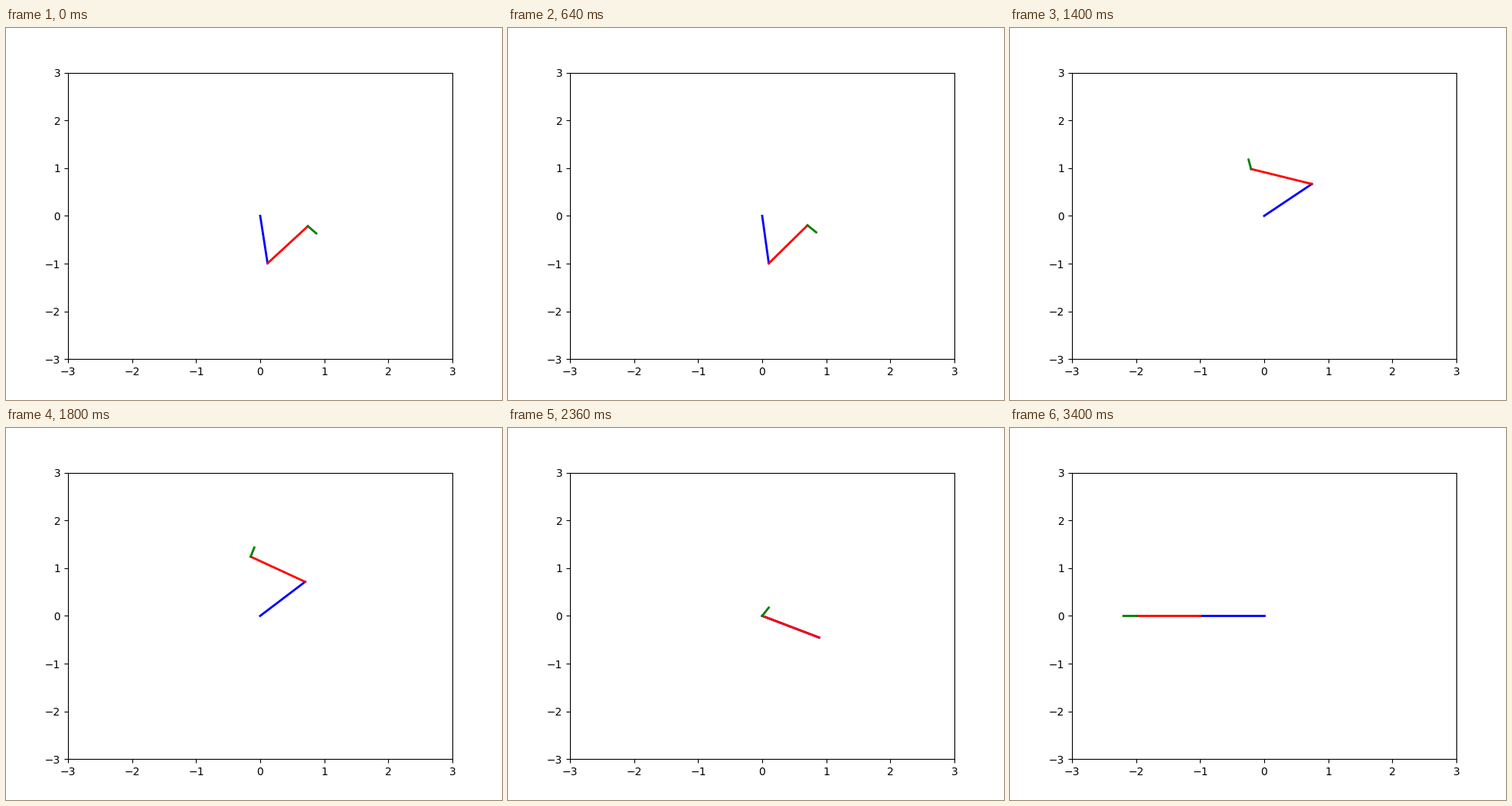
Recreate the animation shown at these times as a matplotlib script. Size 640x480 px, loop 4.34 s.

```python
import numpy as np
import matplotlib.pyplot as plt
from matplotlib.animation import FuncAnimation

INTERVAL = 20        # ms per tick
TICKS = 217          # one loop of 4340 ms
STEP_TICKS = 2       # the arm moves every 40 ms
LAST_STEP = 85       # stretched-out pose, held until the loop ends
LENGTHS = np.array([1.0, 1.0, 0.2])
COLORS = ["blue", "red", "green"]


def swing(step, start, end, turn):
    """Degrees turned so far by an eased move between two steps."""
    u = np.clip((step - start) / (end - start), 0, 1)
    return turn * u * u * (3 - 2 * u)


def shoulder(step):
    sag = swing(step, 0, 16, -0.7)
    lift = swing(step, 16, 31, 126)
    reach = swing(step, 35, 39, 7) + swing(step, 39, 44, -3.4)
    drop = swing(step, 47, 67, -112) + swing(step, 65, 75, 13)
    return -83.4 + sag + lift + reach + drop


def elbow(step):
    close = swing(step, 0, 16, 2.5) + swing(step, 16, 28, 6)
    reach = swing(step, 29, 41, -46.2) + swing(step, 40, 45, 6)
    fold = swing(step, 45, 57, 77.3)
    relax = swing(step, 61, 72, -21.2)
    return 134.4 + close + reach + fold + relax


def wrist(step):
    extend = swing(step, 16, 28, 54)
    bend = swing(step, 28, 42, -28.8) + swing(step, 45, 57, -18.7)
    relax = swing(step, 60, 71, 29.2)
    return -100 + extend + bend + relax


def joint_positions(step):
    if step < LAST_STEP:
        angles = [shoulder(step), elbow(step), wrist(step)]
    else:
        angles = [180, 0, 0]
    heading = np.radians(np.cumsum(angles))
    x = np.concatenate([[0], np.cumsum(LENGTHS * np.cos(heading))])
    y = np.concatenate([[0], np.cumsum(LENGTHS * np.sin(heading))])
    return x, y


fig, ax = plt.subplots(figsize=(6.4, 4.8), dpi=100)
ax.set_xlim(-3, 3)
ax.set_ylim(-3, 3)
links = [ax.plot([], [], color=color, lw=2)[0] for color in COLORS]


def update(tick):
    x, y = joint_positions(min(tick // STEP_TICKS, LAST_STEP))
    for i, link in enumerate(links):
        link.set_data(x[i:i + 2], y[i:i + 2])
    return links


anim = FuncAnimation(fig, update, frames=TICKS, interval=INTERVAL,
                     repeat=True, repeat_delay=0, blit=True)
plt.show()
```
